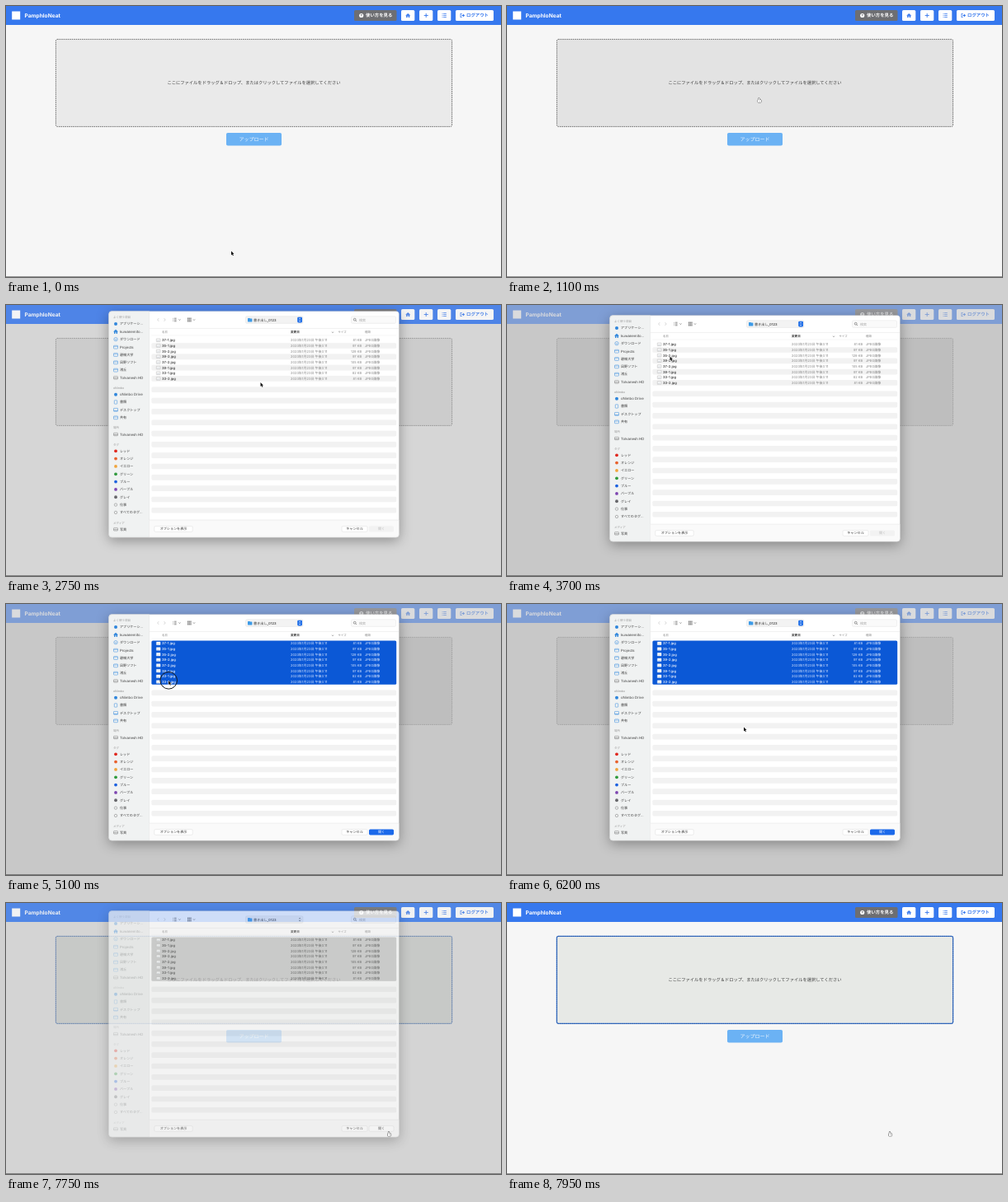
These frames come from a looping animation (600 by 329 pixels, 8 s). An HTML page with a canvas:

```html
<!DOCTYPE html>
<html lang="ja">
<head>
<meta charset="utf-8">
<title>ファイル選択</title>
<style>
html, body { margin: 0; width: 100%; height: 100%; overflow: hidden; background: #f6f6f6; }
canvas { display: block; width: 100vw; height: 100vh; }
</style>
</head>
<body>
<canvas id="stage"></canvas>
<script>
const W = 600, H = 329, LOOP = 8000;
const FONT = 'Inter, "Noto Sans CJK JP", "Noto Sans CJK", "Noto Sans", sans-serif';
const BLUE = '#3678ee', INK = '#5c5c5c';
const stage = document.getElementById('stage');
const sheet = document.createElement('canvas');
const scale = Math.max(1, window.devicePixelRatio || 1);
for (const c of [stage, sheet]) { c.width = W * scale; c.height = H * scale; }
const screen = stage.getContext('2d'), panel = sheet.getContext('2d');
for (const c of [screen, panel]) {
  c.scale(scale, scale);
  c.textRendering = 'geometricPrecision';
}
let g = screen;

// ---- timing ----
const clamp = v => Math.max(0, Math.min(1, v));
const ease = v => { v = clamp(v); return v * v * (3 - 2 * v); };
const OPEN = 2750, FIRST = 4150, ALL = 5020, INACTIVE = 7600, CLOSED = 7900;
const CLICKS = [2080, 4120, 4980, 7300], CLICK_TIME = 240;

// Each move: start, end, destination
const REST = [273, 297.5];
const MOVES = [
  [200, 1300, 308.5, 94], [2900, 3700, 197.5, 62.5], [3700, 4050, 194, 47],
  [4450, 4900, 197, 93], [5350, 6050, 287, 149.5], [6250, 6950, 464, 277.5]
];
function pointerAt(t) {
  let [x, y] = REST;
  for (const [from, to, tx, ty] of MOVES) {
    const p = ease((t - from) / (to - from));
    x += (tx - x) * p;
    y += (ty - y) * p;
  }
  return [x, y];
}
function phases(t) {
  const enter = 1 - (1 - clamp((t - OPEN + 50) / 250)) ** 5;
  const leave = clamp((t - CLOSED + 250) / 250);
  const alpha = 1 - leave ** 1.4;
  return { alpha, dim: enter * alpha, shift: -16 * (1 - enter) - 7.5 * leave };
}

// ---- drawing helpers ----
function text(s, x, y, size, color, weight = 400, align = 'left') {
  g.font = `${weight} ${size}px ${FONT}`;
  g.textAlign = align;
  g.fillStyle = color;
  g.fillText(s, x, y + size * .36);
}
function paint(fill, stroke, lw) {
  if (fill) { g.fillStyle = fill; g.fill(); }
  if (stroke) { g.strokeStyle = stroke; g.lineWidth = lw; g.stroke(); }
}
function box(x, y, w, h, r, fill, stroke, lw = .5) {
  g.beginPath();
  g.roundRect(x, y, w, h, r);
  paint(fill, stroke, lw);
}
function rect(x, y, w, h, fill) {
  g.fillStyle = fill;
  g.fillRect(x, y, w, h);
}
function disc(x, y, r, fill, stroke, lw = .5) {
  g.beginPath();
  g.arc(x, y, r, 0, 7);
  paint(fill, stroke, lw);
}
function line(x1, y1, x2, y2, color, lw = .6) {
  g.beginPath();
  g.moveTo(x1, y1);
  g.lineTo(x2, y2);
  paint(null, color, lw);
}
// A "v" with half width a and depth b, turned by quarter turns
function chevron(x, y, a, b, turns, color, fill) {
  at(x, y, () => {
    g.rotate(turns * Math.PI / 2);
    g.beginPath();
    g.moveTo(-a, -b / 2);
    g.lineTo(0, b / 2);
    g.lineTo(a, -b / 2);
    paint(fill && color, fill ? null : color, .7);
  });
}
function at(x, y, draw) {
  g.save();
  g.translate(x, y);
  draw();
  g.restore();
}
function faded(alpha, draw) {
  g.save();
  g.globalAlpha = alpha;
  draw();
  g.restore();
}

// ---- web page ----
function house(color) {
  chevron(0, -1.2, 3, 2.8, 2, color, true);
  rect(-2, 0, 1.4, 2.6, color);
  rect(.6, 0, 1.4, 2.6, color);
  rect(-2, 0, 4, .9, color);
}
function header() {
  rect(0, 0, W, 23, BLUE);
  rect(7.2, 6.5, 10, 10, '#fff');
  text('PamphloNeat', 22.5, 11.6, 6.6, '#fff', 700);
  box(422, 5, 51.5, 13, 1.6, '#6d6e72');
  disc(430.7, 11.5, 2.6, '#fff');
  text('?', 430.7, 11.5, 4.2, '#6d6e72', 800, 'center');
  text('使い方を見る', 436, 11.5, 5.4, '#fff', 700);
  for (let i = 0; i < 3; i++) box(479 + 22 * i, 5, 16.3, 13, 1.6, '#fff');
  box(545, 5, 46, 13, 1.6, '#fff');
  at(487.2, 11.5, () => house(BLUE));
  at(509.2, 11.5, () => {
    line(-2.5, 0, 2.5, 0, BLUE, .9);
    line(0, -2.5, 0, 2.5, BLUE, .9);
  });
  for (let i = -1; i < 2; i++) {
    rect(528.6, 11.1 + 1.9 * i, .9, .8, BLUE);
    rect(530.2, 11.1 + 1.9 * i, 3.6, .8, BLUE);
  }
  at(553, 11.5, () => {
    line(-2, -2.4, -2, 2.4, BLUE, .8);
    line(-2, -2, -.4, -2, BLUE, .8);
    line(-2, 2, -.4, 2, BLUE, .8);
    line(-.6, 0, 2, 0, BLUE, 1);
    chevron(2, 0, 1.9, 2.2, 3, BLUE, true);
  });
  text('ログアウト', 558, 11.5, 5.4, BLUE, 700);
}
function dropZone(t, dim) {
  const [x, y] = pointerAt(t);
  const over = t < OPEN && x > 60 && x < 541 && y > 40 && y < 146;
  const focus = t >= INACTIVE;
  const frame = (...style) => box(60.4, 40.4, 480.2, 106, 1.8, ...style);
  frame(focus ? '#e7e9e6' : over ? '#e3e3e3' : '#eaeaea');
  if (focus) faded(1 - dim, () => frame(null, '#3f78d0', 1.3));
  faded(1 - .7 * dim, () => {
    g.setLineDash([1.5, 1]);
    frame(null, focus ? '#24509a' : '#4a4a4a', .8);
  });
  text('ここにファイルをドラッグ＆ドロップ、またはクリックしてファイルを選択してください', 300.5, 93.2, 5.28, '#3a3a3a', 400, 'center');
}
function page(t, dim) {
  rect(0, 0, W, H, '#f6f6f6');
  dropZone(t, dim);
  box(267, 154, 67, 15.6, 1.8, '#6bb2f4');
  text('アップロード', 300.5, 161.6, 6, '#f3f8fd', 400, 'center');
  rect(0, 328, W, 1, '#959595');
  header();
  rect(0, 23, W, H - 23, `rgba(0,0,0,${.19 * dim})`);
  rect(0, 0, W, 23, `rgba(188,190,194,${.55 * dim ** 3})`);
}

// ---- file dialog ----
const PLACES = {
  'よく使う項目': ['アプリケーシ…|dot', 'kuwanemito…|house', 'ダウンロード|ring', 'Projects|folder',
    '碧嶺大学|folder', '凪野ソフト|folder', '渚丘|folder', 'Tolvanesh HD|disk'],
  'oNimbo': ['oNimbo Drive|dot', '書類|doc', 'デスクトップ|desk', '共有|folder'],
  '場所': ['Tolvanesh HD|disk'],
  'タグ': ['レッド|#e0281f', 'オレンジ|#e8602c', 'イエロー|#f0a43a', 'グリーン|#2f9a3c', 'ブルー|#1b61e0',
    'パープル|#7d45b0', 'グレイ|#66666a', '仕事|hollow', 'すべてのタグ…|hollow'],
  'メディア': ['写真|disk']
};
const SKY = '#2f86dc';
const ICONS = {
  dot: () => disc(0, 0, 2, SKY),
  house: () => house(SKY),
  ring: () => { disc(0, 0, 2.2, null, SKY); chevron(0, .3, .9, 1, 0, SKY); },
  folder: () => { box(-2.5, -1.7, 5, 3.8, .6, null, SKY); line(-2.5, -.5, 2.5, -.5, SKY, .4); },
  disk: () => { box(-2.5, -1.6, 5, 3.4, .6, null, '#777'); line(-2.4, .5, 2.4, .5, '#777'); },
  doc: () => box(-1.7, -2.2, 3.4, 4.4, .5, null, SKY),
  desk: () => { box(-2.5, -1.9, 5, 3.8, .5, null, SKY); line(-2.4, 1.1, 2.4, 1.1, SKY); },
  hollow: () => disc(0, 0, 1.7, null, '#777')
};
const FILES = ['37-1 81', '35-1 97', '35-2 129', '39-2 97', '37-2 105', '39-1 97', '33-1 82', '33-2 81'];
const ROW = 6.66, TOP = 44.5, LEFT = 176.4, WIDE = 296.8;

function sidebar() {
  let y = 20;
  for (const [heading, items] of Object.entries(PLACES)) {
    text(heading, 130, y, 3.5, '#9a9a9a', 500);
    y += 8;
    for (const item of items) {
      const [label, icon] = item.split('|');
      at(133, y, ICONS[icon] || (() => disc(0, 0, 1.9, icon)));
      text(label, 138, y, /^[a-z]/i.test(label) ? 4.3 : 4.1, '#3c3c3c');
      y += 9.33;
    }
    y += 3;
  }
}
function toolbar(inactive) {
  chevron(184.4, 23, 1.8, 1.6, 1, '#c4c4c4');
  chevron(192.4, 23, 1.8, 1.6, 3, '#c4c4c4');
  for (let i = -1; i < 2; i++) {
    const y = 23 + 1.8 * i;
    disc(202.6, y, .4, INK);
    line(203.8, y, 206.6, y, INK, .7);
    for (let j = 0; j < 3; j++) rect(220 + 1.7 * j, y - .6, 1.2, 1.2, INK);
  }
  for (const x of [210.4, 228]) chevron(x, 23, 1, 1, 0, INK);
  box(290.5, 18.8, 69.5, 8.6, 1.5, '#f3f3f3', '#dedede', .4);
  box(293, 21, 3, 2, .4, '#3d9be8');
  box(293, 21.6, 5.4, 3.8, .4, '#3d9be8');
  text('書き出し_0123', 300, 23.1, 4.1, '#333', 500);
  if (!inactive) box(353.2, 19.8, 5.8, 6.6, 1.3, '#1f6ee8');
  const mark = inactive ? '#555' : '#fff';
  chevron(356.1, 21.8, 1.1, 1, 2, mark);
  chevron(356.1, 24.4, 1.1, 1, 0, mark);
  box(418.5, 18.8, 54, 8.6, 1.5, '#fafafa', '#e0e0e0', .4);
  disc(422.7, 22.7, 1.4, null, INK, .6);
  line(423.7, 23.7, 425, 25, INK);
  text('検索', 428, 23.1, 4, '#aaa');
}
function list(picked, inactive) {
  text('名前', 189, 38.2, 3.4, '#888');
  text('変更日', 345, 38.2, 3.6, '#333', 700);
  chevron(396, 38.2, 1.2, 1.1, 0, '#888');
  text('サイズ', 402.5, 38.2, 3.4, '#888');
  text('種類', 435, 38.2, 3.4, '#888');
  line(LEFT, 42, LEFT + WIDE, 42, '#e9e9e9', .4);
  for (let i = 1; i < 33; i += 2) box(LEFT, TOP + i * ROW, WIDE, ROW, 1.6, '#f2f2f2');
  if (picked) box(LEFT, TOP, WIDE, picked * ROW, 1.6, inactive ? '#cacaca' : '#0b58d6');
  FILES.forEach((file, i) => {
    const [name, size] = file.split(' ');
    const y = TOP + (i + .5) * ROW, lit = i < picked && !inactive;
    const soft = lit ? '#dce8ff' : inactive ? '#444' : '#858585';
    box(182.3, y - 1.8, 4.8, 3.6, .3, '#fafafa', lit ? '#dfe9fb' : '#a5a5a5', .4);
    line(183, y + .9, 186.4, y + .4, '#c3cbd3');
    text(name + '.jpg', 189, y, 4.1, lit ? '#fff' : '#2e2e2e', 500);
    text('2023年1月23日 午後3:11', 345, y, 4, soft);
    text(size + ' KB', 431, y, 4, soft, 400, 'right');
    text('JPEG画像', 435, y, 4, soft);
  });
}
function pushButton(label, x, w, fill = '#fff', ink = '#333') {
  box(x, 273.5, w, 6.9, 1.6, fill, fill === '#fff' ? '#d5d5d5' : null, .4);
  text(label, x + w / 2, 277, 4.1, ink, 500, 'center');
}
function dialog(t) {
  const inactive = t >= INACTIVE;
  const picked = t < FIRST ? 0 : t < ALL ? 1 : FILES.length;
  const frame = (...style) => box(124.5, 12.6, 352, 274.6, 4, ...style);
  g.clearRect(0, 0, W, H);
  g.save();
  g.shadowColor = 'rgba(0,0,0,.34)';
  g.shadowBlur = 15 * scale;
  g.shadowOffsetY = 4 * scale;
  frame('#fff');
  g.restore();
  g.save();
  frame();
  g.clip();
  rect(124, 12, 49.5, 276, '#f0f2f2');
  rect(173.3, 12, .5, 276, '#dfe1e1');
  rect(173.8, 33.4, 303, .5, '#e4e4e4');
  rect(173.8, 266, 303, 22, '#fafafa');
  rect(173.8, 265.8, 303, .5, '#e2e2e2');
  g.restore();
  faded(inactive ? .4 : 1, sidebar);
  toolbar(inactive);
  list(picked, inactive);
  pushButton('オプションを表示', 179.8, 46.4);
  pushButton('キャンセル', 407, 31);
  const state = inactive ? [] : picked ? ['#1b69ea', '#fff'] : ['#f2f2f2', '#bdbdbd'];
  pushButton('開く', 440, 30, ...state);
  frame(null, 'rgba(0,0,0,.16)', .5);
}

// ---- pointer ----
function arrow() {
  g.lineJoin = 'round';
  const body = new Path2D('M0 0V4.9L1.1 3.9 2 5.7 2.9 5.3 2 3.6H3.5Z');
  g.strokeStyle = '#fff';
  g.lineWidth = .9;
  g.stroke(body);
  g.fillStyle = '#111';
  g.fill(body);
}
function hand() {
  for (const edge of [.6, 0]) {
    const color = edge ? '#222' : '#fff';
    const part = (x, y, w, h) => box(x, y, w, h, .6, color, edge ? color : null, edge);
    part(-.7, 0, 1.3, 4);
    part(-1.4, 2.3, 4, 3.2);
  }
  for (const x of [.5, 1.4]) line(x, 3.4, x, 4.6, '#555', .3);
}
function pointer(t) {
  const [x, y] = pointerAt(t);
  const linked = t < OPEN ? y < 146 : t >= 7700;
  if (CLICKS.some(c => t >= c && t < c + CLICK_TIME)) disc(x + .2, y - .2, 10.3, null, '#1c1c1c', 1);
  at(x, y, linked ? hand : arrow);
}

function render(t) {
  const { alpha, dim, shift } = phases(t);
  page(t, dim);
  if (t >= OPEN && t < CLOSED) {
    g = panel;
    dialog(t);
    g = screen;
    faded(alpha, () => g.drawImage(sheet, 0, shift, W, H));
  }
  pointer(t);
}
const start = performance.now();
function tick() {
  render((performance.now() - start) % LOOP);
  requestAnimationFrame(tick);
}
tick();
</script>
</body>
</html>
```
